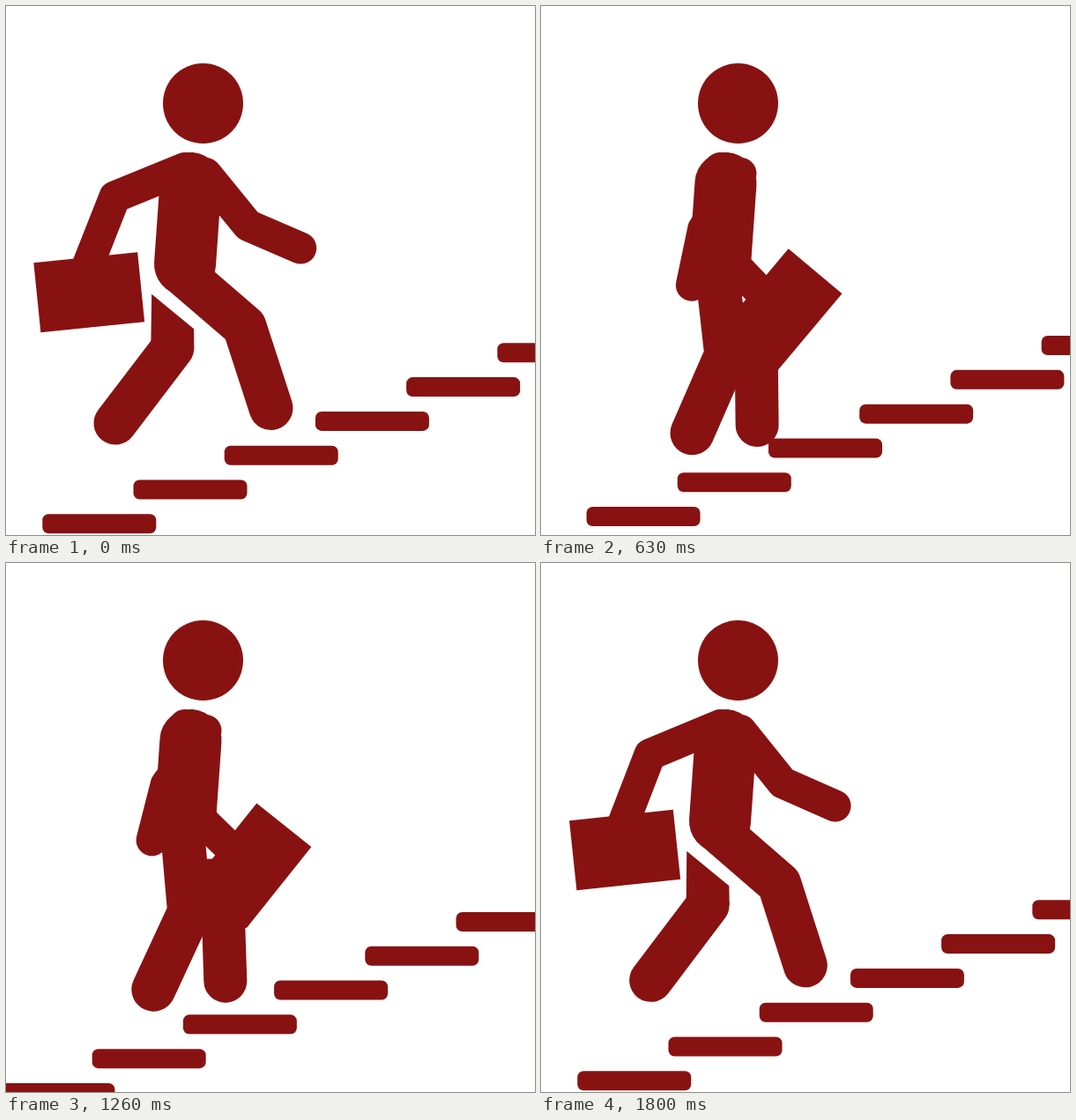
Recreate the animation shown at these times as an HTML page with a canvas. Size 600 by 600 pixels, loop 1830 ms.

```html
<!DOCTYPE html>
<html lang="en">
<head>
<meta charset="utf-8">
<title>Climbing the stairs</title>
<style>
  html, body { margin: 0; width: 100%; height: 100%; overflow: hidden; background: #fff; }
  canvas { display: block; width: 600px; height: 600px; }
</style>
</head>
<body>
<canvas id="stage" width="600" height="600"></canvas>
<script>
const ctx = document.getElementById('stage').getContext('2d');
const LOOP = 1830, TICK = 30, COLOR = '#881212';
const STEP = { dx: 103.2, dy: 38.8, w: 129, h: 22, r: 7 };

const lerp = (a, b, p) => a + (b - a) * p;

// Eased progress from 0 to 1 between two times; lag above 1 delays the middle.
function ease(t, from, to, lag = 1) {
  const u = Math.min(1, Math.max(0, (t - from) / (to - from))) ** lag;
  return u * u * (3 - 2 * u);
}

// Limbs swing to the opposite pose and back once per loop.
const stride = t => ease(t, 0, 893, 1.2) - ease(t, 893, LOOP, 1.2);

function reach([x, y], length, deg) {
  const a = deg * Math.PI / 180;
  return [x + length * Math.cos(a), y + length * Math.sin(a)];
}

function limb(width, ...points) {
  ctx.lineWidth = width;
  ctx.beginPath();
  points.forEach(p => ctx.lineTo(...p));
  ctx.stroke();
}

function placed([x, y], deg, draw) {
  ctx.save();
  ctx.translate(x, y);
  ctx.rotate(deg * Math.PI / 180);
  draw();
  ctx.restore();
}

// Two eased moves per loop carry the stairs by two steps.
function stairs(t) {
  const first = ease(t, 0, 935), second = ease(t, 935, 1800);
  const x = 41.3 - 1.2 * STEP.dx * first - 0.8 * STEP.dx * second;
  const y = 576.3 + 1.05 * STEP.dy * first + 0.95 * STEP.dy * second;
  for (let k = -1; k < 9; k++) {
    ctx.beginPath();
    ctx.roundRect(x + k * STEP.dx, y - k * STEP.dy, STEP.w, STEP.h, STEP.r);
    ctx.fill();
  }
}

function body() {
  ctx.beginPath();
  ctx.arc(223.5, 110.5, 45.5, 0, 7);
  ctx.fill();
  limb(70, [209.5, 201], [203, 293]);
}

function freeArm(p) {
  const shoulder = [226.5, 190], angle = lerp(50.8, 151, p);
  const elbow = reach(shoulder, 76, angle);
  limb(36, shoulder, elbow, reach(elbow, 65, angle + lerp(-27.5, -20, p)));
}

function bagArm(p) {
  const shoulder = [203, 184], fore = lerp(111.5, 22, p), tilt = lerp(84.2, 23.6, p);
  const elbow = reach(shoulder, 86, lerp(157.8, 70.5, p));
  const hand = reach(elbow, 87, fore);
  limb(36, shoulder, elbow, hand);
  placed(reach(hand, lerp(27.5, 18.5, p), tilt), tilt, () => ctx.fillRect(-39.7, -59.2, 79.4, 118.4));
}

function nearLeg(p) {
  const hip = [200, 303], knee = reach(hip, 93, lerp(40.7, 99.6, p));
  limb(50, hip, knee, reach(knee, 97, lerp(72, 129, p)));
}

// The far thigh ends in a slanted cut, leaving a gap below the near thigh.
function farLeg(p) {
  const hip = [190, 304], thigh = lerp(90.8, 35, p);
  const knee = reach(hip, 84, thigh);
  placed(hip, thigh, () => {
    ctx.beginPath();
    ctx.moveTo(23, 24.5);
    ctx.lineTo(62, -24);
    ctx.lineTo(84, -24.5);
    ctx.lineTo(84, 24.5);
    ctx.fill();
  });
  limb(49, knee, reach(knee, 107, lerp(127.3, 75.2, p)));
}

function draw(t) {
  ctx.fillStyle = '#fff';
  ctx.fillRect(0, 0, 600, 600);
  ctx.fillStyle = ctx.strokeStyle = COLOR;
  ctx.lineCap = ctx.lineJoin = 'round';
  const p = stride(t);
  stairs(t);
  body();
  farLeg(p);
  nearLeg(p);
  freeArm(p);
  bagArm(p);
}

const start = performance.now();
function frame() {
  const t = (performance.now() - start) % LOOP;
  draw(Math.floor(t / TICK) * TICK);
  requestAnimationFrame(frame);
}
frame();
</script>
</body>
</html>
```
